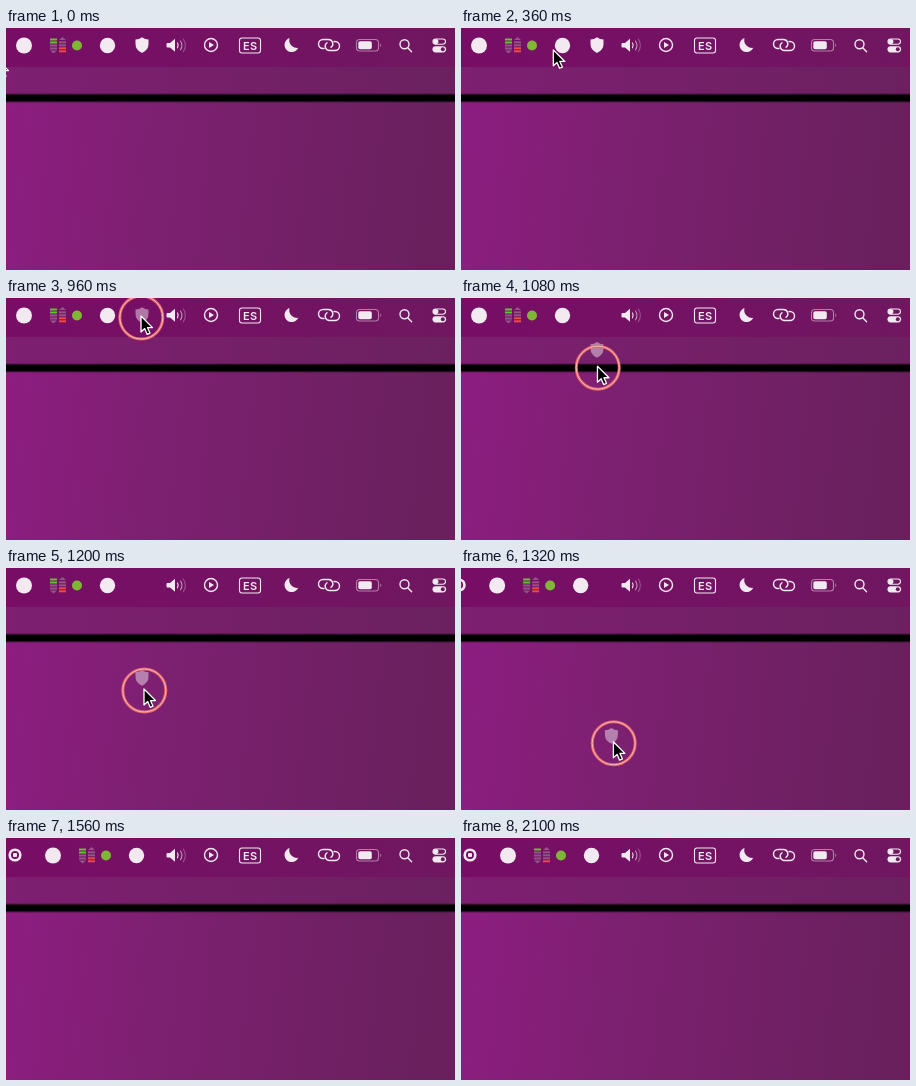
Animation of 449 by 242 pixels, one loop 2230 ms. Source, as an HTML page:

```html
<!DOCTYPE html>
<html lang="en">
<head>
<meta charset="utf-8">
<title>Menu bar drag</title>
<style>
  html, body { margin: 0; width: 100%; height: 100%; overflow: hidden; background: #7c2070; }
  svg { display: block; width: 100vw; height: 100vh; --ink: #f3e9f1; }
  text { font: 600 11px Inter, Arial, sans-serif; letter-spacing: 0.3px; }
  .ink { fill: var(--ink); }
  .line { fill: none; stroke: var(--ink); stroke-width: 1.4; stroke-linecap: round; stroke-linejoin: round; }
  .thin { stroke-width: 1.1; }
</style>
</head>
<body>
<svg viewBox="0 0 449 242">
  <defs>
    <linearGradient id="wall" x2="1" y2="0.06">
      <stop offset="0" stop-color="#8e1d81"/>
      <stop offset="0.4" stop-color="#7c2070"/>
      <stop offset="1" stop-color="#69205d"/>
    </linearGradient>
    <linearGradient id="strip">
      <stop offset="0" stop-color="#7e1f71"/>
      <stop offset="1" stop-color="#6b215f"/>
    </linearGradient>
    <linearGradient id="menu">
      <stop offset="0" stop-color="#780d66"/>
      <stop offset="1" stop-color="#701760"/>
    </linearGradient>
    <linearGradient id="gap" x2="0" y2="1">
      <stop offset="0" stop-opacity="0"/>
      <stop offset="0.25"/>
      <stop offset="0.75"/>
      <stop offset="1" stop-opacity="0"/>
    </linearGradient>
  </defs>

  <rect width="449" height="242" fill="url(#wall)"/>
  <rect width="449" height="70" fill="url(#strip)"/>
  <rect width="449" height="39" fill="url(#menu)"/>
  <rect y="65" width="449" height="10" fill="url(#gap)"/>

  <g id="leftIcons" class="ink">
    <circle class="line" cx="-20" cy="17" r="5.3" style="stroke-width:2.6"/>
    <rect x="-22" y="15" width="4" height="4" rx="1"/>
    <circle cx="18" cy="17.5" r="8"/>
    <g id="meters"></g>
    <circle cx="71" cy="17.5" r="5" fill="#80b636"/>
    <circle cx="101.5" cy="17.5" r="7.7"/>
  </g>

  <!-- sound -->
  <path class="ink" d="M161.500 15h2.500l5-4.200v13L164 19.500h-2.500q-1 0-1-1v-2.500q0-1 1-1z"/>
  <path class="line thin" d="M171.500 15q1.600 2.400 0 4.800"/>
  <path class="line thin" d="M174.500 13q3 4.400 0 8.800" opacity="0.6"/>
  <path class="line thin" d="M177.300 11q4.200 6.400 0 12.800" opacity="0.3"/>
  <!-- play -->
  <circle class="line" cx="205" cy="17" r="6.500"/>
  <path class="ink" d="M203 14l5 3-5 3z"/>
  <!-- language -->
  <rect class="line thin" x="233.500" y="10" width="21" height="15" rx="2.500"/>
  <text class="ink" x="244.200" y="21.500" text-anchor="middle">ES</text>
  <!-- moon -->
  <path class="ink" d="M283.500 10A7.200 7.200 0 1 0 292.300 19.800A7.800 7.800 0 0 1 283.500 10z"/>
  <!-- links -->
  <path class="line" d="M318 20.500h-1a4.500 4.500 0 0 1 0-9h5.500a4.300 4.300 0 0 1 2.500 7.800"/>
  <path class="line" d="M328 13.500h1a4.500 4.500 0 0 1 0 9h-5.500a4.300 4.300 0 0 1-2.500-7.800"/>
  <!-- battery -->
  <rect class="line thin" x="350.500" y="11.500" width="22" height="11.500" rx="3.300" opacity="0.5"/>
  <rect class="ink" x="352.300" y="13.200" width="13.500" height="8.100" rx="1.800"/>
  <path class="ink" d="M374.300 15.200q2 2 0 4z" opacity="0.5"/>
  <!-- search -->
  <circle class="line" cx="398.500" cy="16.300" r="4.500"/>
  <path class="line" d="M402 20l3.600 3.700"/>
  <!-- switches -->
  <rect class="line thin" x="427" y="11" width="12.500" height="5.200" rx="2.600"/>
  <circle class="ink" cx="429.800" cy="13.600" r="2.600"/>
  <rect class="ink" x="426.500" y="18.200" width="13.600" height="6.200" rx="3.100"/>
  <circle cx="436.800" cy="21.300" r="2" fill="#701760"/>

  <path id="shield" class="ink" d="M0-7.800Q3-5.600 6.500-5.500V-1Q6.500 5 0 8Q-6.500 5-6.500-1V-5.500Q-3-5.600 0-7.800z"/>
  <g id="ring" fill="none">
    <circle r="21.500" stroke="#e2646c" stroke-width="3"/>
    <circle r="21.500" stroke="#f8bcb6" stroke-width="1"/>
  </g>
  <path id="cursor" stroke="#fff" stroke-width="1.300" stroke-linejoin="round"
        d="M0 0V16L3.700 12.600L6.200 18.400L9 17.200L6.500 11.600H11.500z"/>
</svg>
<script>
const LOOP = 2230, STEP = 60;
const ENTER = 240, ARRIVE = 600, PRESS = 840, DRAG = 966, TURN = 1200;
const byId = id => document.getElementById(id);
const progress = (time, from, to) => Math.min(1, Math.max(0, (time - from) / (to - from)));
const easeOut = p => 1 - (1 - p) ** 3;
const easeInOut = p => p * p * (3 - 2 * p);

function place(id, x, y, opacity = 1) {
  const element = byId(id);
  element.setAttribute('transform', `translate(${x} ${y})`);
  element.setAttribute('opacity', opacity);
}

// Straight down at a steady speed, then veering right after TURN.
const veer = time => 0.12 * Math.max(0, time - TURN);
const fall = (time, from, speed) => speed * Math.max(0, time - from);

function cursorAt(time) {
  const arrival = easeOut(progress(time, ENTER, ARRIVE));
  const x = -9 + 144 * arrival + 3 * progress(time, DRAG, TURN) + veer(time);
  const y = 31 - 13 * arrival + fall(time, DRAG, 0.44);
  return [x, y];
}

function meters(lit) {
  const gray = '#8f5686';
  const stripe = (x, y, color) => `<rect x="${x}" y="${y}" width="7" height="2" fill="${color}"/>`;
  let marks = `<path fill="${gray}" d="M44 22.500h7l-3.500 3zM53 12h7l-3.500-3z"/>`;
  for (let i = 0; i < 4; i++) {
    marks += stripe(44, 10.5 + i * 3, i < lit ? '#5fc52f' : gray);
    marks += stripe(53, 22.3 - i * 3, i < lit ? '#ef4a42' : gray);
  }
  byId('meters').innerHTML = marks;
}

function draw(now) {
  const time = Math.floor((now % LOOP) / STEP) * STEP;
  const [x, y] = cursorAt(time);
  const pressed = time >= PRESS;
  const cursorShown = time < STEP || time > ENTER;

  place('cursor', x, y, cursorShown ? 1 : 0);
  place('ring', x + 0.3, y + 1.5, pressed ? 1 : 0);
  place('shield', 136 + veer(time), 17 + fall(time, DRAG + 42, 0.483), pressed ? 0.48 : 1);
  place('leftIcons', 29 * easeInOut(progress(time, TURN, 1405)), 0);
  meters(time < 2100 ? 2 : 1);
}

const start = performance.now();
function tick() {
  draw(performance.now() - start);
  requestAnimationFrame(tick);
}
tick();
</script>
</body>
</html>
```
